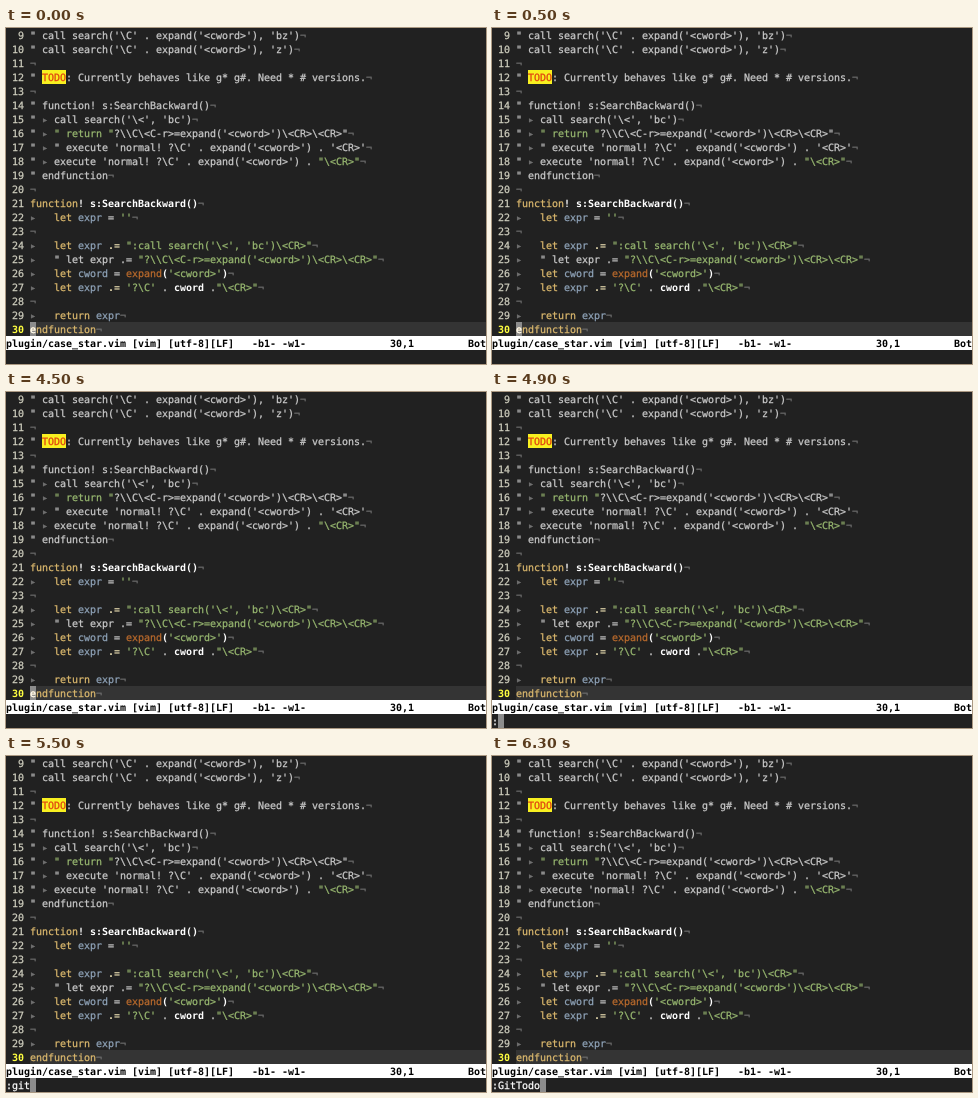
Animation of 480 by 336 pixels, one loop 8 s. Source, as an HTML page with a canvas:

```html
<!DOCTYPE html>
<html>
<head>
<meta charset="utf-8">
<style>
html, body { margin: 0; width: 100%; height: 100%; overflow: hidden; background: #212121; }
canvas { display: block; }
</style>
</head>
<body>
<canvas id="screen" width="480" height="336"></canvas>
<script>
const ctx = document.getElementById('screen').getContext('2d');
const CELL = 6, ROW = 14, GUTTER = 4, FIRST = 9, LOOP = 8000;
const FONT = '10px "DejaVu Sans Mono", monospace';
const color = {
  back: '#212121', line: '#343434', cursor: '#8c8c8c', plain: '#cfcfcf',
  number: '#cfcebe', current: '#ffff40', hidden: '#707070', comment: '#cacaca',
  keyword: '#dcb96e', name: '#8fa3b8', string: '#98b870', call: '#b96a2c',
  operator: '#e8dcb0', bright: '#ffffff', todo: '#e04010', todoBack: '#f8f020',
  status: '#ffffff', ink: '#000000'
};

const source = String.raw`" call search('\C' . expand('<cword>'), 'bz')
" call search('\C' . expand('<cword>'), 'z')

" TODO: Currently behaves like g* g#. Need * # versions.

" function! s:SearchBackward()
" ▸ call search('\<', 'bc')
" ▸ " return "?\\C\<C-r>=expand('<cword>')\<CR>\<CR>"
" ▸ " execute 'normal! ?\C' . expand('<cword>') . '<CR>'
" ▸ execute 'normal! ?\C' . expand('<cword>') . "\<CR>"
" endfunction

function! s:SearchBackward()
▸   let expr = ''

▸   let expr .= ":call search('\<', 'bc')\<CR>"
▸   " let expr .= "?\\C\<C-r>=expand('<cword>')\<CR>\<CR>"
▸   let cword = expand('<cword>')
▸   let expr .= '?\C' . cword ."\<CR>"

▸   return expr
endfunction`.split('\n');

// In a comment, a quoted string must follow a word and a space.
const commentRules = [
  ['hidden', /▸|¬/y], ['todo', /TODO/y],
  ['string', /(?<=[^\s▸][\s▸]+)"[^"]*"/y], ['comment', /./y]
];
const codeRules = [
  ['hidden', /▸|¬/y], ['string', /"[^"]*"|'[^']*'/y],
  ['keyword', /endfunction|function|let|return/y], ['call', /expand/y],
  ['bright', /s:\w+\(\)|[()!]/y], ['operator', /\.=/y],
  ['name', /expr|cword(?= =)/y], ['bright', /cword/y], ['plain', /./y]
];
const boldKinds = ['bright', 'operator'];

const commands = [
  [4900, ':'], [5200, ':g'], [5300, ':gi'], [5400, ':git'],
  [5700, ':gitt'], [5800, ':gitto'], [6300, ':GitTodo']
];

function fill(col, row, cols, style) {
  ctx.fillStyle = style;
  ctx.fillRect(col * CELL, row * ROW, cols * CELL, ROW);
}

// Places every character on the terminal grid; regular text gets a hairline for weight.
function write(text, col, row, style, bold) {
  ctx.font = (bold ? 'bold ' : '') + FONT;
  ctx.fillStyle = ctx.strokeStyle = style;
  [...text].forEach((ch, i) => {
    const x = (col + i) * CELL, y = row * ROW + 11;
    ctx.fillText(ch, x, y);
    if (!bold) ctx.strokeText(ch, x, y);
  });
}

function writeCode(text, row) {
  const rules = /^(▸ +)?"/.test(text) ? commentRules : codeRules;
  const full = text + '¬';
  for (let at = 0; at < full.length;) {
    for (const [kind, rule] of rules) {
      rule.lastIndex = at;
      const match = rule.exec(full);
      if (!match) continue;
      const col = GUTTER + at;
      if (kind === 'todo') fill(col, row, 4, color.todoBack);
      write(match[0], col, row, color[kind], boldKinds.includes(kind));
      at += match[0].length;
      break;
    }
  }
}

function draw(time) {
  const command = commands.filter(([start]) => time >= start).pop()?.[1] ?? '';
  const last = source.length - 1, status = source.length, prompt = status + 1;

  ctx.fillStyle = color.back;
  ctx.fillRect(0, 0, 480, 336);
  fill(GUTTER, last, 76, color.line);
  if (command) fill(command.length, prompt, 1, color.cursor);
  else fill(GUTTER, last, 1, color.cursor);

  source.forEach((text, row) => {
    const current = row === last;
    write(String(row + FIRST).padStart(3), 0, row, current ? color.current : color.number, current);
    writeCode(text, row);
  });
  if (!command) write('e', GUTTER, last, color.bright);

  fill(0, status, 80, color.status);
  write('plugin/case_star.vim [vim] [utf-8][LF]', 0, status, color.ink, true);
  write('-b1- -w1-', 41, status, color.ink, true);
  write('30,1', 64, status, color.ink, true);
  write('Bot', 77, status, color.ink, true);
  write(command, 0, prompt, color.bright);
}

ctx.textRendering = 'geometricPrecision';
ctx.lineWidth = 0.25;
const begin = performance.now();
function tick() {
  draw((performance.now() - begin) % LOOP);
  requestAnimationFrame(tick);
}
tick();
</script>
</body>
</html>
```
